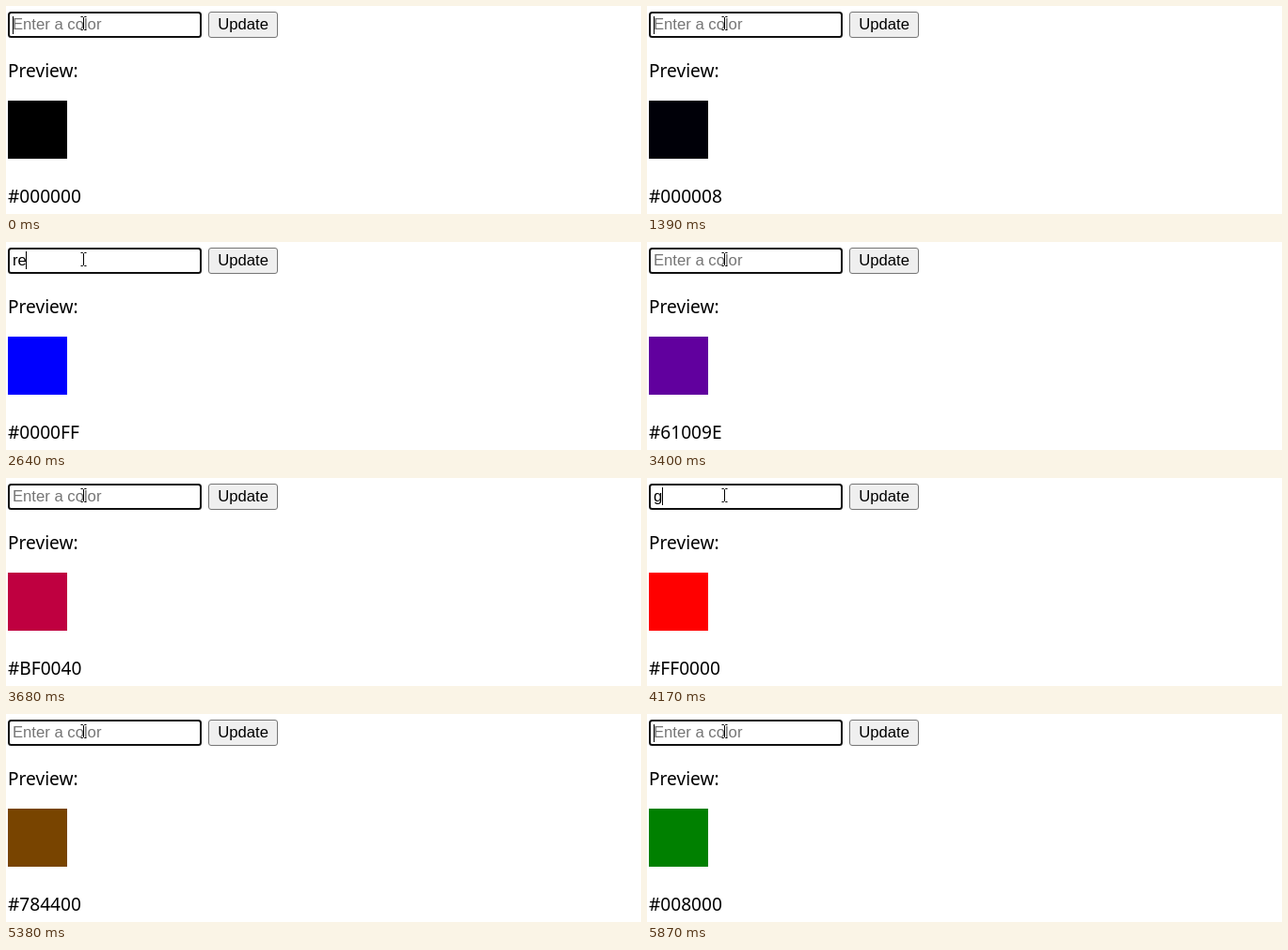
These frames come from a looping animation (675x222 px, 6270 ms). An HTML page:

```html
<!DOCTYPE html>
<html lang="en">
<head>
<meta charset="utf-8">
<title>Color preview</title>
<style>
  html, body { margin: 0; width: 100%; height: 100%; overflow: hidden; background: #fff; }
  svg { display: block; }
  .ui { font: 16.667px Arial, "Liberation Sans", sans-serif; }
  .page { font: 19.1px "Noto Sans", "Open Sans", sans-serif; }
</style>
</head>
<body>
<svg width="675" height="222" viewBox="0 0 675 222">
  <rect x="3" y="7" width="204" height="26" rx="2.5" fill="#fff" stroke="#101010" stroke-width="2"/>
  <text id="field" class="ui" x="7" y="25"></text>
  <rect id="caret" width="1" height="19"/>
  <rect x="215.5" y="6.5" width="73" height="27" rx="2.5" fill="#efefef" stroke="#767676"/>
  <text class="ui" x="225.2" y="25">Update</text>
  <path d="M79.5 11.5h2l1 1l1 -1h2M82.5 12.5v12M79.5 25.5h2l1 -1l1 1h2" fill="none" stroke="#000"/>
  <text class="page" x="2" y="76">Preview:</text>
  <rect id="swatch" x="2" y="101" width="63" height="62"/>
  <text id="hex" class="page" x="2" y="210"></text>
</svg>
<script>
const LOOP = 6270, TICK = 70, FADE = 762, BLINK = 530;
const [field, caret, swatch, hex] =
  ['field', 'caret', 'swatch', 'hex'].map(id => document.getElementById(id));

// keys: time of each keystroke; submit: field clears; fade: color starts to move
const entries = [
  { word: 'blue', keys: [600, 730, 870, 1060], submit: 1390, fade: 1366, rgb: [0, 0, 255] },
  { word: 'red', keys: [2570, 2640, 2840], submit: 3120, fade: 3110, rgb: [255, 0, 0] },
  { word: 'green', keys: [4170, 4370, 4500, 4630, 4760], submit: 4960, fade: 4976, rgb: [0, 128, 0] }
];

// The preview refreshes in fixed ticks after each submit.
function snap(t) {
  for (const { submit } of entries) {
    const since = t - submit;
    if (since >= 0 && since < 14 * TICK) return submit + Math.floor(since / TICK) * TICK;
  }
  return t;
}

function draw(time) {
  const t = snap(time);
  let color = [0, 0, 0], typed = '';
  let lastKey = entries[2].keys.at(-1) - LOOP;

  for (const { word, keys, submit, fade, rgb } of entries) {
    const count = keys.filter(k => k <= t).length;
    if (count) lastKey = keys[count - 1];
    if (t < submit) {
      typed += word.slice(0, count);
      continue;
    }
    const p = Math.min(1, Math.max(0, (t - fade) / FADE));
    color = color.map((c, i) => Math.round(c + (rgb[i] - c) * p));
  }

  field.textContent = typed || 'Enter a color';
  field.setAttribute('fill', typed ? '#000' : '#757575');
  const width = typed ? field.getComputedTextLength() : 0;
  caret.setAttribute('x', Math.floor(7 + width));
  caret.setAttribute('y', typed ? 10 : 11);
  const blinkOn = Math.floor((t - lastKey + 10) / BLINK) % 2 === 0;
  caret.setAttribute('visibility', blinkOn ? 'visible' : 'hidden');

  const code = '#' + color.map(c => c.toString(16).padStart(2, '0')).join('').toUpperCase();
  swatch.setAttribute('fill', code);
  hex.textContent = code;
}

const start = performance.now();
function frame() {
  draw((performance.now() - start) % LOOP);
  requestAnimationFrame(frame);
}
frame();
</script>
</body>
</html>
```
